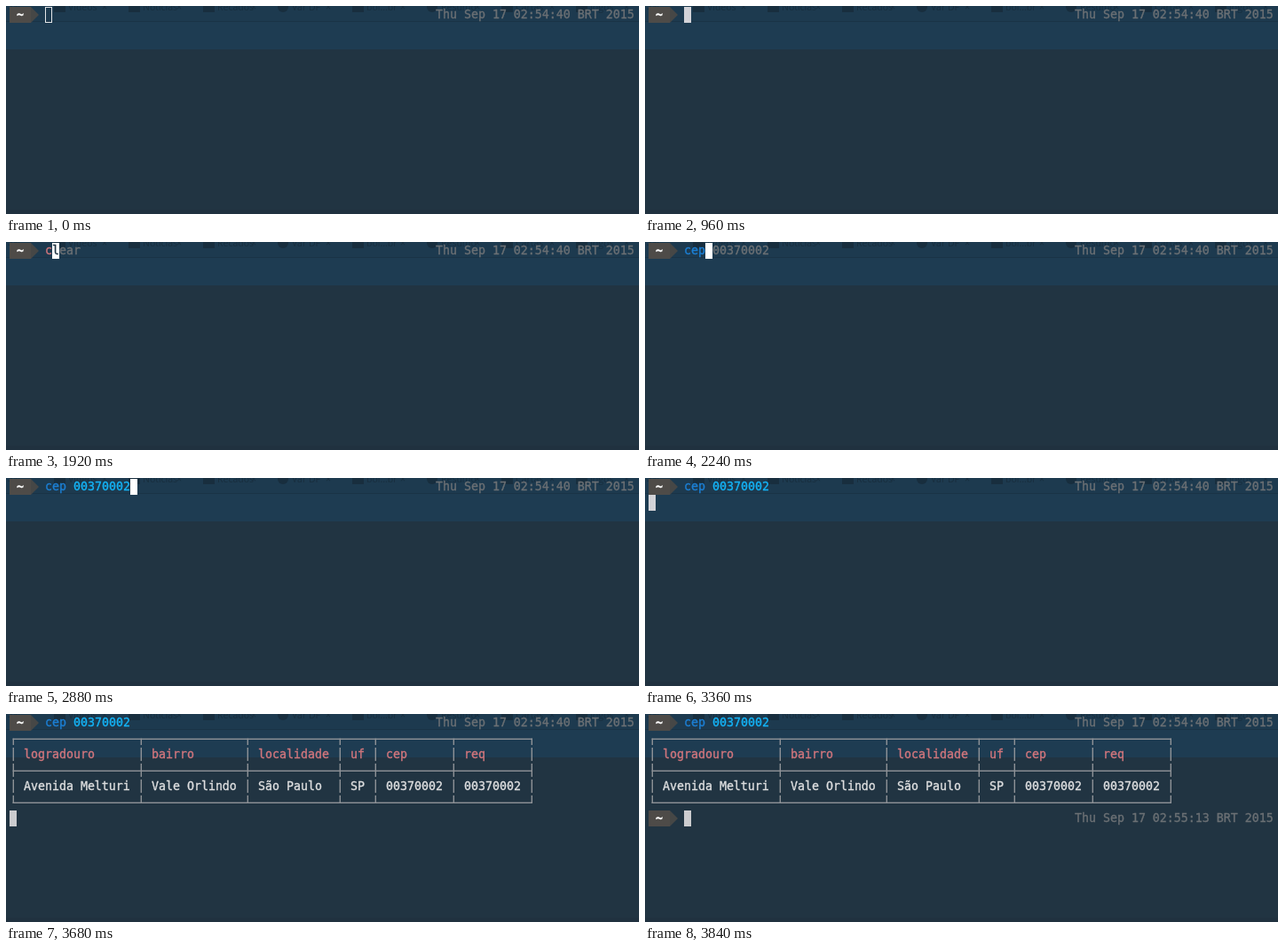
Recreate the animation shown at these times as an HTML page with a canvas. Size 713 by 235 pixels, loop 5.44 s.

```html
<!DOCTYPE html>
<html lang="pt-BR">
<head>
<meta charset="utf-8">
<style>
html, body { margin: 0; overflow: hidden; background: #213442; }
canvas { display: block; }
</style>
</head>
<body>
<canvas id="stage" width="713" height="235"></canvas>
<script>
const ctx = document.getElementById('stage').getContext('2d');
const LOOP = 5440, CELL = 8, ROW = 18;
const MONO = '13.288px "DejaVu Sans Mono", monospace';
const GREY = '#6b7074', RED = '#d2767c', BLUE = '#1c7fd4', CYAN = '#14b4f7', WHITE = '#dedfe0';
const BORDER = '#8e9297';
const CEP = '00370002';

const headers = ['logradouro', 'bairro', 'localidade', 'uf', 'cep', 'req'];
const values = ['Avenida Melturi', 'Vale Orlindo', 'São Paulo', 'SP', CEP, CEP];
const widths = [17, 14, 12, 4, 10, 10];

// Labels of the browser tabs showing through the window; some have a round icon
const tabs = ['Vídeos', 'Notícias', 'Recados', 'Var DF', 'bol...br', 'Resumo', 'Cartas', 'Jogos'];
const roundIcons = [3, 5];

function rect(x, y, w, h, color) {
  ctx.fillStyle = color;
  ctx.fillRect(x, y, w, h);
}

// The thin stroke gives the heavier look of smoothed terminal text
function text(str, col, row, color, weight = '') {
  const x = 4 + col * CELL, y = 14 + row * ROW;
  ctx.font = weight + ' ' + MONO;
  ctx.fillStyle = ctx.strokeStyle = color;
  ctx.lineWidth = 0.35;
  ctx.fillText(str, x, y);
  ctx.strokeText(str, x, y);
}

function background() {
  rect(0, 0, 713, 235, '#213442');
  rect(0, 0, 713, 49, '#1e3c52');
  rect(0, 0, 713, 17, '#1d3a4f');
  rect(0, 17, 713, 1, '#1a3346');
  rect(0, 230, 713, 5, '#20313f');
  ctx.font = '10.5px "Open Sans", sans-serif';
  const ink = '#182e3e';
  tabs.forEach((label, i) => {
    const x = 53 + i * 84;
    ctx.fillStyle = ink;
    if (roundIcons.includes(i)) {
      ctx.beginPath();
      ctx.arc(x + 7, 1, 6, 0, 7);
      ctx.fill();
    } else {
      ctx.fillRect(x + 1, -3, 13, 10);
    }
    ctx.fillText(label, x + 17, 5);
    ctx.fillText('×', x + 55, 5);
  });
  ctx.fillText('Sac', 2, 4);
}

function prompt(row, time) {
  const y = 1 + row * ROW;
  rect(4, y, 24, ROW, '#4e4b48');
  ctx.fillStyle = '#464746';
  ctx.beginPath();
  ctx.moveTo(28, y);
  ctx.lineTo(37, y + 9);
  ctx.lineTo(28, y + 18);
  ctx.fill();
  text('~', 1, row, '#fff', 'bold');
  text(`Thu Sep 17 ${time} BRT 2015`, 60, row, GREY);
}

function cursor(col, row, color = '#d3d3d8') {
  rect(4 + col * CELL, 1 + row * ROW, CELL, ROW, color);
}

function table() {
  const edges = [0];
  widths.forEach(w => edges.push(edges.at(-1) + w + 1));
  const edgeX = edge => 7.6 + edge * CELL;
  const left = edgeX(0), right = edgeX(edges.at(-1)) + 1.4;

  for (let row = 1; row <= 5; row++) {
    const middle = 9.6 + row * ROW;
    const top = row === 1 ? middle : 2 + row * ROW;
    const bottom = row === 5 ? middle + 1.4 : 17 + row * ROW;
    if (row % 2) rect(left, middle, right - left, 1.4, BORDER);
    edges.forEach(edge => rect(edgeX(edge), top, 1.4, bottom - top, BORDER));
  }
  headers.forEach((header, i) => {
    text(header, edges[i] + 2, 2, RED);
    text(values[i], edges[i] + 2, 4, WHITE);
  });
}

// Typed prefix over a grey suggestion, with the block cursor after the prefix
function typing(typed, suggestion, color) {
  const n = typed.length;
  text(typed, 5, 0, color);
  text(suggestion.slice(n), 5 + n, 0, GREY);
  cursor(5 + n, 0, '#fff');
  text(suggestion[n], 5 + n, 0, '#213442');
}

function draw(t) {
  background();
  prompt(0, '02:54:40');
  const command = 'cep ' + CEP;
  if (t < 960) {
    ctx.strokeStyle = '#e4e6e8';
    ctx.lineWidth = 1;
    ctx.strokeRect(44.5, 1.5, 7, 17);
  } else if (t < 1920) {
    cursor(5, 0);
  } else if (t < 2080) {
    typing('c', 'clear', RED);
  } else if (t < 2240) {
    typing('ce', command, RED);
  } else if (t < 2880) {
    typing('cep', command, BLUE);
  } else {
    text('cep', 5, 0, BLUE);
    text(CEP, 9, 0, CYAN);
    if (t < 3360) cursor(17, 0, '#fff');
    else if (t < 3680) cursor(0, 1);
    else {
      table();
      if (t < 3840) cursor(0, 6, '#cccccf');
      else {
        prompt(6, '02:55:13');
        cursor(5, 6, '#cccccf');
      }
    }
  }
}

const start = performance.now();
function tick() {
  draw((performance.now() - start) % LOOP);
  requestAnimationFrame(tick);
}
tick();
</script>
</body>
</html>
```
